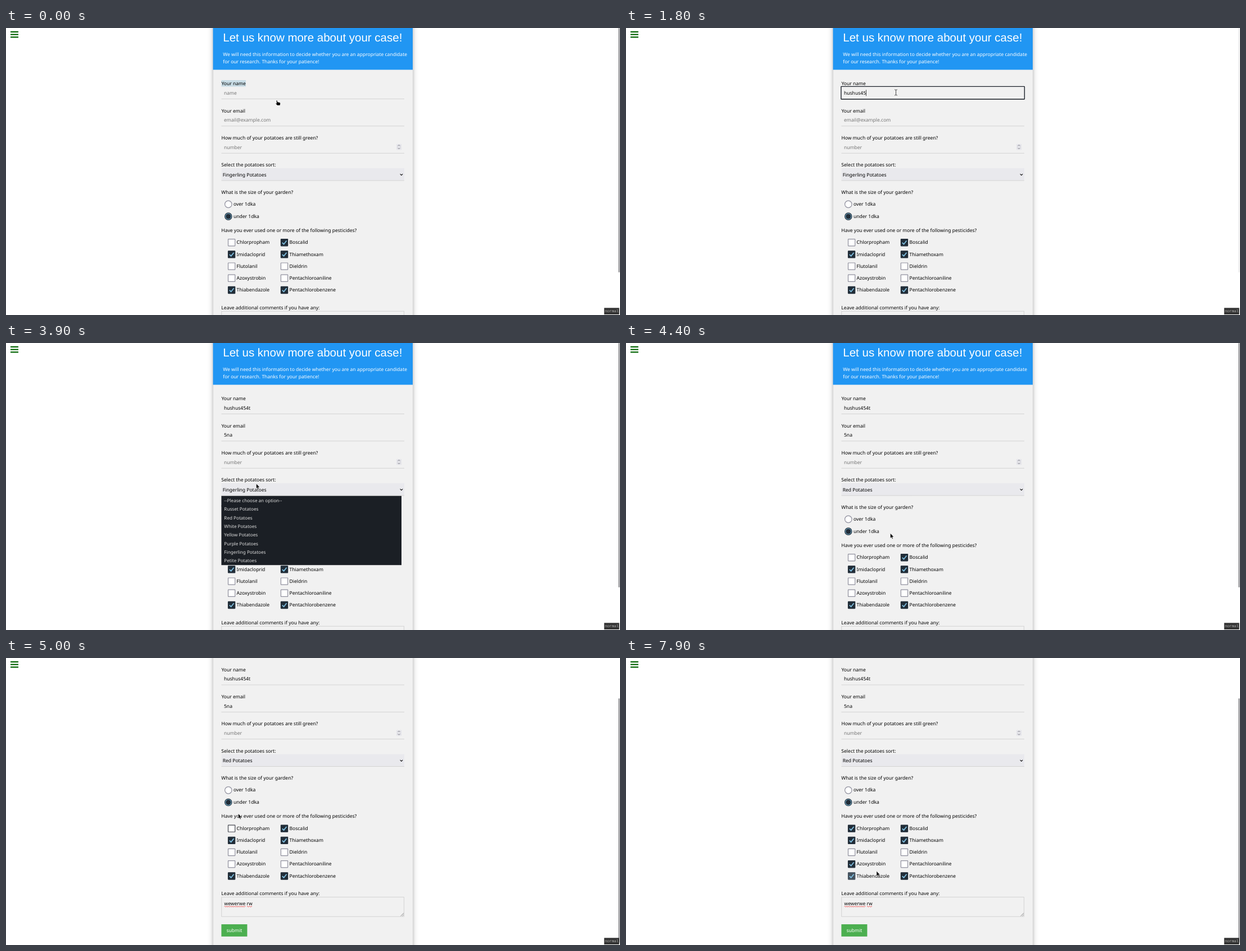
These frames come from a looping animation (1093 by 512 pixels, 8000 ms). An HTML page:

```html
<!DOCTYPE html>
<html lang="en">
<head>
<meta charset="utf-8">
<title>Potato form</title>
<style>
html, body { margin: 0; width: 100%; height: 100%; overflow: hidden; background: #fff; }
.back { position: fixed; inset: 0; overflow: hidden; contain: strict; }
.card {
  position: absolute; left: 368.5px; top: -20px; width: 355.5px; height: 560px; background: #f1f1f1;
  box-shadow: 0 2.3px 5.7px rgba(0,0,0,.2), 0 2.3px 11.4px rgba(0,0,0,.19);
}
svg { position: fixed; left: 0; top: 0; width: 100%; height: 100%; display: block; overflow: hidden; contain: strict; }
/* The tiny turn keeps baselines from snapping to whole pixels */
text {
  font: 8.54px "Noto Sans", sans-serif; fill: #000; white-space: pre;
  text-rendering: geometricPrecision; transform: rotate(.004deg);
}
text.title { font: 20.5px "Liberation Sans", Arial, sans-serif; }
text.white { fill: #fff; }
text.hint { fill: #757575; }
text.option { font-size: 8.12px; fill: #dedede; }
text.mode { font: 6.8px "Liberation Mono", monospace; fill: #b5b5b5; }
</style>
</head>
<body>
<div class="back"><div class="card"></div></div>
<svg id="stage" viewBox="0 0 1093 512"></svg>
<script>
const LOOP = 8000, STEP = 100, SCROLL = 78.55;
const USER = "hushus454t", MAIL = "5na";
const DARK = "#212d38", LINE = "#ccc", GREY = "#8f8f9d", TICK = "#83c4e6";
const stage = document.getElementById("stage");

function add(parent, tag, attrs) {
  const el = document.createElementNS("http://www.w3.org/2000/svg", tag);
  for (const k in attrs) el.setAttribute(k, attrs[k]);
  parent.appendChild(el);
  return el;
}
const group = parent => add(parent, "g", {});
const rect = (p, x, y, width, height, fill, more) => add(p, "rect", { x, y, width, height, fill, ...more });
const path = (p, d, stroke, width, more) =>
  add(p, "path", { d, stroke, fill: "none", "stroke-width": width, ...more });
function label(p, x, y, str, cls = "") {
  const el = add(p, "text", { x, y, class: cls });
  el.textContent = str;
  return el;
}
const show = (el, on) => el.setAttribute("visibility", on ? "visible" : "hidden");

// Page content, moved as one by the scroll
const page = group(stage);
rect(page, 368.5, -20, 355.5, 94.5, "#2196f3");
label(page, 386.3, 24.1, "Let us know more about your case!", "title white");
label(page, 386.3, 50.1, "We will need this information to decide whether you are an appropriate candidate", "white");
label(page, 386.3, 63, "for our research. Thanks for your patience!", "white");

const mark = rect(page, 383.4, 93, 43.6, 11.6, "#c9dde6");

function field(i, title, hint) {
  const y = 102.1 + i * 48.39;
  label(page, 383.4, y, title);
  rect(page, 383.4, y + 24, 325.6, 0.8, LINE);
  const text = label(page, 388, y + 16.8, hint, "hint");
  const ring = rect(page, 382.9, y + 2.3, 326.5, 22.6, "none",
    { stroke: "#1b2029", "stroke-width": 1.4, rx: 0.4 });
  const caret = rect(page, 388, y + 8.2, 0.7, 11, "#000");
  return (value, focus) => {
    text.textContent = value || hint;
    text.setAttribute("class", value ? "" : "hint");
    caret.setAttribute("x", 388.2 + (value ? text.getComputedTextLength() : 0));
    show(ring, focus);
    show(caret, focus);
  };
}
const setName = field(0, "Your name", "name");
const setMail = field(1, "Your email", "email@example.com");
const setCount = field(2, "How much of your potatoes are still green?", "number");
rect(page, 695, 207, 9.2, 10.4, "#e5e5ea", { rx: 1 });
path(page, "M697.5 210.6l2-2 2 2M697.5 213.8l2 2 2-2", "#5b5b66", 0.8);

label(page, 383.4, 247.2, "Select the potatoes sort:");
rect(page, 383.4, 250.2, 325.6, 21.6, "#e9e9ed");
rect(page, 383.4, 271.7, 325.6, 0.8, LINE);
path(page, "M701.6 260.4l2.3 2.3 2.3-2.3", "#111", 1.1);
const sort = label(page, 385.7, 264.6, "");

label(page, 383.4, 296, "What is the size of your garden?");
function radio(y, title) {
  label(page, 405, y + 3, title);
  const ring = add(page, "circle", { cx: 395.8, cy: y + 0.4, r: 6.2, fill: "#fff", "stroke-width": 1.2 });
  const dot = add(page, "circle", { cx: 395.8, cy: y + 0.4, r: 4.7, fill: DARK });
  return on => {
    ring.setAttribute("stroke", on ? DARK : GREY);
    ring.setAttribute("fill", on ? TICK : "#fff");
    show(dot, on);
  };
}
const setOver = radio(314, "over 1dka");
const setUnder = radio(335.7, "under 1dka");

label(page, 383.4, 364, "Have you ever used one or more of the following pesticides?");
function check(col, row, title) {
  const x = 394.9 + col * 93.9, y = 376 + row * 21.2;
  label(page, x + 15.7, y + 9.4, title);
  const box = rect(page, x + 0.6, y + 0.6, 12.2, 12.2, "#fff", { "stroke-width": 1.2, rx: 0.5 });
  const tick = path(page, `M${x + 3} ${y + 6.9}l2.7 2.8 4.9-6.2`, TICK, 1.7);
  return (on, edge = on ? DARK : GREY) => {
    box.setAttribute("fill", on ? edge : "#fff");
    box.setAttribute("stroke", edge);
    show(tick, on);
  };
}
const boxes = [
  ["Chlorpropham", "Imidacloprid", "Flutolanil", "Azoxystrobin", "Thiabendazole"],
  ["Boscalid", "Thiamethoxam", "Dieldrin", "Pentachloroaniline", "Pentachlorobenzene"]
].map((names, col) => names.map((name, row) => check(col, row, name)));
const [[chlor, imida, fluto, azoxy, thiab], [bosca, thiam, dield, anili, benze]] = boxes;
[imida, bosca, thiam, benze].forEach(set => set(true));
[fluto, dield, anili].forEach(set => set(false));

label(page, 383.4, 501.9, "Leave additional comments if you have any:");
rect(page, 383.8, 505.2, 324.8, 34.6, "#f1f1f1", { stroke: LINE, "stroke-width": 0.8 });
label(page, 388.5, 519.3, "wewerwe rw");
const wave = (x, n) => path(page, `M${x} 522q.9-1.5 1.8 0` + "t1.8 0".repeat(n), "#e22", 0.8);
wave(388.6, 20);
wave(429, 4);
path(page, "M702.5 539l5.5-5.5M705.3 539l2.7-2.7", "#777", 0.8);
rect(page, 383.4, 553.6, 46, 21.8, "#4caf50");
label(page, 392.5, 567.6, "submit", "white");

const menu = group(page);
rect(menu, 383.4, 272.8, 320.6, 123.4, "#1b1f25");
["--Please choose an option--", "Russet Potatoes", "Red Potatoes", "White Potatoes", "Yellow Potatoes",
  "Purple Potatoes", "Fingerling Potatoes", "Petite Potatoes"]
  .forEach((name, i) => label(menu, 388.4, 283.9 + i * 15.35, name, "option"));

// Fixed parts
[5.8, 10.5, 15.2].forEach(y => rect(stage, 8, y, 14, 2.2, "#006400"));
const thumb = rect(stage, 1090.5, 0, 1.7, 436, "#75757a", { rx: 0.8 });
rect(stage, 1064.8, 499.3, 26.8, 11.7, "#333");
label(stage, 1066, 507.3, "normal", "mode");

// Pointer shapes, hot spot at 0,0
const pointer = group(stage);
const shapes = {
  hand: path(pointer, "M-2.8-4.2q1.2-.6 1.6.4l.5 2.2 4.2 1Q4.7.2 4.2 2.2L3.7 4.6H-1.2L-4 1.2q.2-1 1.9-.2Z",
    "#fff", 0.4, { fill: "#000" }),
  beam: path(pointer, "M-2.4-5Q0-5 0-4Q0-5 2.4-5M0-4V4M-2.4 5Q0 5 0 4Q0 5 2.4 5", "#333", 0.9),
  arrow: path(pointer, "M0 0V8.7L2 6.9 3.4 10 4.8 9.4 3.5 6.4H6.2Z", "#fff", 0.5, { fill: "#000" })
};
const moves = [
  [0, 484, 133.5, "hand"], [100, 484, 133.5, "hand"], [300, 482.5, 122, "beam"], [500, 480.5, 115, "beam"],
  [2100, 480.5, 115, "beam"], [2500, 437, 164, "beam"], [3000, 437, 164, "beam"], [3100, 437, 211, "beam"],
  [3400, 437, 211, "arrow"], [3600, 445.5, 251, "arrow"], [3900, 445.5, 251, "arrow"],
  [4100, 448, 308, "arrow"], [4200, 450, 311, "arrow"], [4400, 470.5, 339.5, "arrow"],
  [4600, 470.5, 339.5, "arrow"], [5000, 413.5, 277.8, "arrow"], [5200, 411, 262, "arrow"],
  [5400, 414, 236, "arrow"], [5500, 414, 236, "arrow"], [5700, 412, 256, "arrow"],
  [5800, 412, 256, "arrow"], [6100, 430, 306.8, "arrow"], [6500, 430, 306.8, "arrow"],
  [7000, 433, 356, "arrow"], [7200, 431, 368, "arrow"], [7400, 431, 367, "arrow"],
  [7500, 431, 367, "arrow"], [7900, 446, 380.3, "arrow"]
];
const scrolls = [[4400, 0], [4500, 22], [4600, 48], [4700, 67], [4800, 76], [4900, SCROLL]];
const fades = [[1000, 1], [1800, 0.18], [2000, 0], [2100, 0], [2300, 1]];

function at(keys, t) {
  const i = keys.findLastIndex(k => k[0] <= t);
  if (i < 0) return keys[0].slice(1);
  const a = keys[i], b = keys[i + 1];
  if (!b) return a.slice(1);
  const f = (t - a[0]) / (b[0] - a[0]);
  return a.slice(1).map((v, j) => typeof v === "number" ? v + (b[j + 1] - v) * f : v);
}

function draw(t) {
  const [scroll] = at(scrolls, t), [x, y, kind] = at(moves, t);
  page.setAttribute("transform", `translate(0 ${-scroll})`);
  pointer.setAttribute("transform", `translate(${x} ${y})`);
  for (const k in shapes) show(shapes[k], k === kind);
  thumb.setAttribute("y", scroll * 72 / SCROLL);
  thumb.setAttribute("opacity", at(fades, t)[0]);

  show(mark, t < 700);
  const typed = Math.max(0, Math.min(USER.length, (t - 1000) / STEP));
  setName(USER.slice(0, typed), t >= 700 && t < 3000);
  setMail(t < 3000 ? "" : MAIL.slice(0, t < 3100 ? 1 : 3), t >= 3000 && t < 3300);
  setCount("", t >= 3300 && t < 3600);
  show(menu, t >= 3700 && t < 4300);
  sort.textContent = (t < 4300 ? "Fingerling" : "Red") + " Potatoes";

  const over = t >= 5500 && t < 5800;
  setOver(over);
  setUnder(!over);
  if (t >= 6500) chlor(true);
  else chlor(false, t < 4900 ? GREY : "#44464f");
  azoxy(t >= 7300);
  thiab(true, t >= 7800 ? "#45535f" : DARK);
}

let last = -1;
function tick() {
  const t = Math.floor(performance.now() % LOOP / STEP) * STEP;
  if (t !== last) draw(last = t);
  requestAnimationFrame(tick);
}
tick();
</script>
</body>
</html>
```
